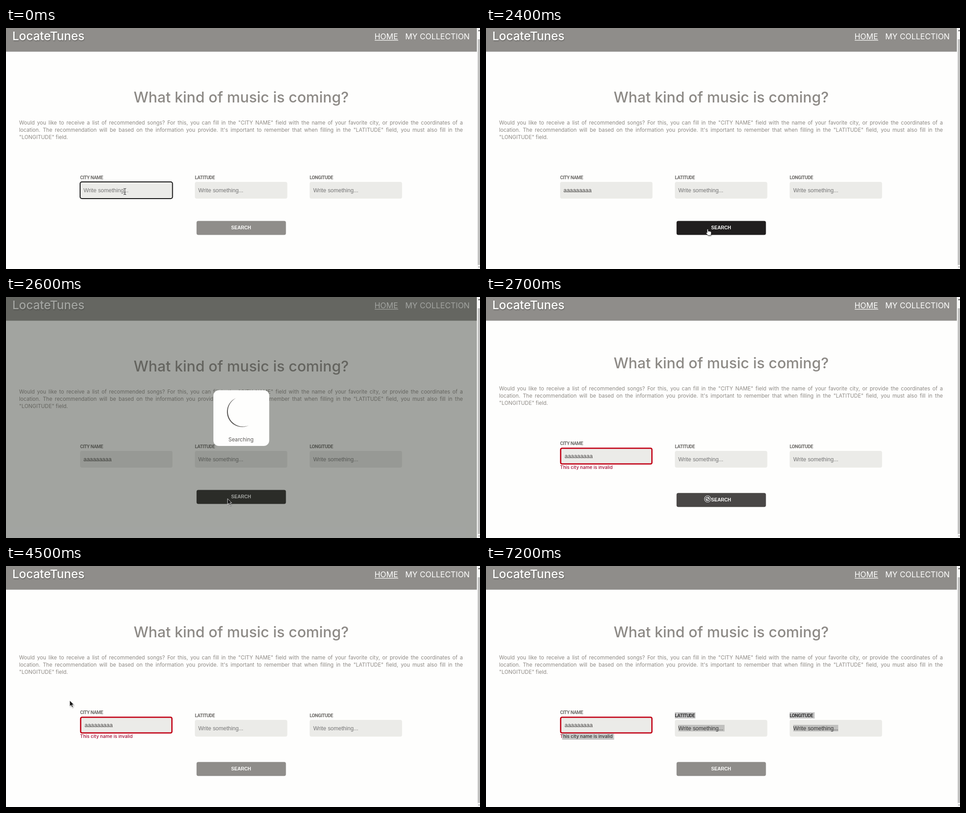
These frames come from a looping animation (1049 by 534 pixels, 7.4 s). An HTML page:

```html
<!DOCTYPE html>
<html lang="en">
<head>
<meta charset="utf-8">
<title>Music search form</title>
<style>
html, body { margin: 0; width: 100%; height: 100%; overflow: hidden; background: #fefefd; }
svg { display: block; }
text { white-space: pre; }
.head { font-family: Inter, sans-serif; }
.label { font: 700 10.5px Roboto, sans-serif; letter-spacing: -.5px; fill: #6f6d6a; }
.field { font: 12.4px "Liberation Sans", Arial, sans-serif; fill: #757575; }
.value { fill: #413f3e; }
.box { fill: #ebebe8; }
.error { font: 500 10.2px Inter, sans-serif; fill: #a3062f; }
.mark { fill: var(--mark); }
.picked, .picked text { fill: var(--ink); }
.copy { margin: 0; font: 11.6px/16px Inter, sans-serif; color: #8d8984; }
.copy div { white-space: nowrap; text-align-last: justify; }
.copy div:last-child { text-align-last: left; }
</style>
</head>
<body>
<svg id="stage" width="1049" height="534" viewBox="0 0 1049 534">
  <defs>
    <clipPath id="selClip"><rect id="selArea" x="168.5" y="371" width="0" height="14"/></clipPath>
    <filter id="soft" x="-50%" y="-50%" width="220%" height="220%">
      <feDropShadow dx="1" dy="1.5" stdDeviation="1" flood-opacity=".35"/>
    </filter>
  </defs>
  <rect width="1049" height="534" fill="#fefefd"/>
  <rect width="1042" height="52.5" fill="#8f8d8a"/>
  <g class="head" fill="#fefefd">
    <text x="14" y="27" font-size="26.3" font-weight="500" style="text-shadow:1px 2px 2px rgba(50,48,46,.35)">LocateTunes</text>
    <text x="815.5" y="25" font-size="17.3">HOME</text>
    <rect x="816" y="26.6" width="52" height="1.3"/>
    <text x="883.5" y="25" font-size="17.3">MY COLLECTION</text>
  </g>

  <g id="intro">
    <text class="head" x="520.5" y="165" text-anchor="middle" font-size="32.65" font-weight="500" fill="#8d8a86">What kind of music is coming?</text>
    <foreignObject x="29" y="202" width="982" height="52">
      <div class="copy">
        <div>Would you like to receive a list of recommended songs? For this, you can fill in the "CITY NAME" field with the name of your favorite city, or provide the coordinates of a</div>
        <div>location. The recommendation will be based on the information you provide. It's important to remember that when filling in the "LATITUDE" field, you must also fill in the</div>
        <div>"LONGITUDE" field.</div>
      </div>
    </foreignObject>
    <text class="label" x="164" y="335">CITY NAME</text>
    <rect class="box" id="cityBox" x="164" y="341" width="204.5" height="37" rx="4"/>
    <text class="field" id="city" x="171.5" y="363.5"></text>
    <rect id="caret" y="352" width="1" height="14" fill="#222"/>
  </g>

  <g id="others">
    <rect class="box" x="418" y="341" width="204.5" height="37" rx="4"/>
    <rect class="box" x="672" y="341" width="204.5" height="37" rx="4"/>
    <g class="mark" id="marks">
      <rect x="418" y="324" width="45.5" height="14"/>
      <rect x="425.5" y="352" width="102.5" height="14.5"/>
      <rect x="672" y="324" width="55.5" height="14"/>
      <rect x="680" y="352" width="99.5" height="14.5"/>
    </g>
    <text class="label" x="418" y="335">LATITUDE</text>
    <text class="field" x="425.5" y="363.5">Write something...</text>
    <text class="label" x="672" y="335">LONGITUDE</text>
    <text class="field" x="680" y="363.5">Write something...</text>
  </g>

  <g id="invalid">
    <text class="error" x="164" y="381.3">This city name is invalid</text>
    <g clip-path="url(#selClip)">
      <rect x="168" y="371" width="116" height="14" fill="#fefefd"/>
      <rect class="mark" x="168" y="371" width="116" height="14"/>
      <text class="error picked" x="164" y="381.3">This city name is invalid</text>
    </g>
  </g>

  <g id="button">
    <rect id="face" x="421.7" y="427.6" width="197.8" height="30.9" rx="4"/>
    <text x="520.3" y="446.1" text-anchor="middle" fill="#fefefd" style="font:700 10.4px 'Liberation Sans',Arial,sans-serif">SEARCH</text>
  </g>

  <g id="loader">
    <rect width="1042" height="534" fill="rgb(50,54,48)" fill-opacity=".45"/>
    <rect x="459" y="206.5" width="123.5" height="123.5" rx="12" fill="#fefefd"/>
    <path id="spinner" fill="#565452"/>
    <text class="head" x="520" y="320" text-anchor="middle" font-size="11.7" fill="#5c5a58">Searching</text>
  </g>

  <rect x="1042" width="7" height="534" fill="#f8f8f7"/>
  <rect x="1044" y="25" width="5" height="500" fill="#c1c1c0"/>
  <path d="M1044.5 7l2.5-3 2 2.5v.5z" fill="#505050"/>
  <path d="M1044.5 528.5h4.5l-2 3z" fill="#a3a3a3"/>

  <g id="cursor">
    <g id="beam" fill="none">
      <path d="M-3-6.5Q0-6.5 0-5Q0-6.5 3-6.5M0-5V5.5M-3 7Q0 7 0 5.5Q0 7 3 7M-1.5 2H1.5" stroke="#fff" stroke-width="2.4" stroke-opacity=".7"/>
      <path d="M-3-6.5Q0-6.5 0-5Q0-6.5 3-6.5M0-5V5.5M-3 7Q0 7 0 5.5Q0 7 3 7M-1.5 2H1.5" stroke="#222" stroke-width="1.1"/>
    </g>
    <path id="arrow" d="M0 0V13L3 10.3L5.2 15L7.4 14L5.3 9.5H9.3Z" fill="#151515" stroke="#fff" stroke-width=".8" filter="url(#soft)"/>
    <path id="hand" d="M0 1Q1.2-.6 2.4 1V5Q3.6 4 4.7 5.2Q6 4.3 7 5.6Q8.6 5 9 7V10Q9 12 7.8 14H1.8Q.5 11.8-2 9.4Q-2.6 7.6-.7 7.8L0 8.6Z" fill="#fff" stroke="#222" stroke-width=".8" filter="url(#soft)"/>
    <g id="banned">
      <circle r="7" fill="#333" stroke="#eee" stroke-width="1.2"/>
      <circle r="3.8" fill="none" stroke="#fff" stroke-width="1.5"/>
      <path d="M-2.7 2.7L2.7-2.7" stroke="#fff" stroke-width="1.5"/>
    </g>
  </g>
</svg>
<script>
const LOOP = 7400, STEP = 100;
const $ = id => document.getElementById(id);
const show = (id, on) => $(id).setAttribute('display', on ? 'inline' : 'none');
const shift = (id, y) => $(id).setAttribute('transform', `translate(0 ${y})`);
const set = (el, attrs) => { for (const k in attrs) el.setAttribute(k, attrs[k]); };

const IDLE = [143, 141, 138], READY = [81, 80, 77], HOVER = [32, 30, 30];
// start, from, to, duration
const FADES = [[260, IDLE, READY, 600], [1860, READY, HOVER, 480], [2560, HOVER, IDLE, 600]];
const KEYS = [300, 500, 700, 900, 1100, 1300, 1500, 1600, 1800];

// time, x, y, pointer shape
const TRACK = [
  [0, 263, 362, 'beam'], [1000, 263, 362, 'beam'], [1100, 330, 388, 'arrow'],
  [1300, 440, 402, 'arrow'], [1800, 475, 417, 'arrow'], [1900, 482, 434, 'hand'],
  [2000, 489, 445.5, 'hand'], [2400, 489.3, 445.5, 'hand'], [2500, 490, 446, 'arrow'],
  [2700, 490.5, 447.5, 'banned'], [2900, 528, 441, 'banned'], [3000, 556, 420, 'arrow'],
  [3100, 571, 405, 'arrow'], [3200, 571, 405, 'arrow'], [3300, 527, 405, 'arrow'],
  [3600, 527, 405, 'arrow'], [3700, 525, 405, 'arrow'], [3900, 525, 405, 'arrow'],
  [4100, 430, 230, 'arrow'], [4300, 210, 3, 'arrow'], [4400, 95, 130, 'arrow'],
  [4500, 141, 298, 'arrow'], [4700, 187, 374, 'arrow'], [4800, 174, 378, 'beam'],
  [4900, 166, 378, 'beam'], [5000, 166, 378, 'beam'], [5300, 250, 380, 'beam'],
  [5400, 266, 384, 'arrow'], [5500, 272, 384, 'arrow'], [5700, 272, 384, 'arrow'],
  [5900, 250, 367, 'beam'], [6000, 250, 367, 'beam'], [6100, 278, 377, 'beam'],
  [LOOP, 278, 377, 'beam']
];

function ease(p) {
  // cubic-bezier(.25, .1, .25, 1)
  const curve = (u, a, b) => 3 * u * (1 - u) * (1 - u) * a + 3 * u * u * (1 - u) * b + u * u * u;
  let lo = 0, hi = 1;
  for (let i = 0; i < 20; i++) {
    const mid = (lo + hi) / 2;
    if (curve(mid, .25, .25) < p) lo = mid; else hi = mid;
  }
  return curve(lo, .1, 1);
}

function buttonColor(t) {
  let color = IDLE;
  for (const [start, from, to, span] of FADES) {
    if (t < start) break;
    const k = ease(Math.min(1, (t - start) / span));
    color = from.map((v, i) => Math.round(v + (to[i] - v) * k));
  }
  return `rgb(${color})`;
}

function pointer(t) {
  let i = 0;
  while (i < TRACK.length - 2 && TRACK[i + 1][0] <= t) i++;
  const [t0, x0, y0, kind] = TRACK[i], [t1, x1, y1] = TRACK[i + 1];
  const k = (t - t0) / (t1 - t0);
  return { x: x0 + (x1 - x0) * k, y: y0 + (y1 - y0) * k, kind };
}

function crescent(deg) {
  // thickest at deg, tapering to nothing on both sides
  const r = 33.5, thick = 2.2, half = 95, pts = [];
  const at = (a, rad) => {
    const q = (deg + a) * Math.PI / 180;
    pts.push(`${(522.5 + rad * Math.cos(q)).toFixed(2)} ${(254.5 + rad * Math.sin(q)).toFixed(2)}`);
  };
  for (let a = -half; a <= half; a += 5) at(a, r);
  for (let a = half; a >= -half; a -= 5) at(a, r - thick * Math.cos(a / half * Math.PI / 2));
  return `M${pts.join('L')}Z`;
}

function drawCity(t, bad) {
  const typed = KEYS.filter(k => k <= t).length;
  const focus = t < 2200;
  const text = $('city');
  text.textContent = typed ? 'a'.repeat(typed) : 'Write something...';
  text.classList.toggle('value', typed > 0);
  text.setAttribute('x', bad ? 174 : 171.5);
  set($('cityBox'), bad
    ? { x: 165.2, y: 342.2, width: 202, height: 34.6, rx: 3, stroke: '#c10015', 'stroke-width': 2.8 }
    : { x: 164, y: 341, width: 204.5, height: 37, rx: 4, stroke: focus ? '#101010' : 'none', 'stroke-width': 2 });
  show('caret', focus && t >= 100);
  $('caret').setAttribute('x', 171.5 + typed * 12.4 * .556);
}

function drawSelection(t, p) {
  const all = t >= 5300, away = t >= 7200;
  const end = all ? 283.5 : t >= 5100 ? p.x : 168.5;
  $('selArea').setAttribute('width', Math.max(0, end - 168.5));
  show('marks', all);
  $('others').classList.toggle('picked', all);
  const css = $('stage').style;
  css.setProperty('--mark', away ? 'rgba(163,163,163,.6)' : 'rgba(0,129,255,.88)');
  css.setProperty('--ink', away ? '#323232' : '#000');
}

function draw(t) {
  const bad = t >= 2700, p = pointer(t);
  shift('intro', bad ? -7 : 0);
  shift('button', bad ? 6.7 : 0);
  show('invalid', bad);
  drawCity(t, bad);
  $('face').setAttribute('fill', buttonColor(t));
  show('loader', t >= 2500 && t < 2700);
  $('spinner').setAttribute('d', crescent(155 + (t - 2600) * .36));
  drawSelection(t, p);
  show('cursor', t < 7200);
  $('cursor').setAttribute('transform', `translate(${p.x.toFixed(1)} ${p.y.toFixed(1)})`);
  for (const kind of ['beam', 'arrow', 'hand', 'banned']) show(kind, kind === p.kind);
}

const began = performance.now();
function tick() {
  const t = (performance.now() - began) % LOOP;
  draw(Math.floor(t / STEP) * STEP);
  requestAnimationFrame(tick);
}
tick();
</script>
</body>
</html>
```
